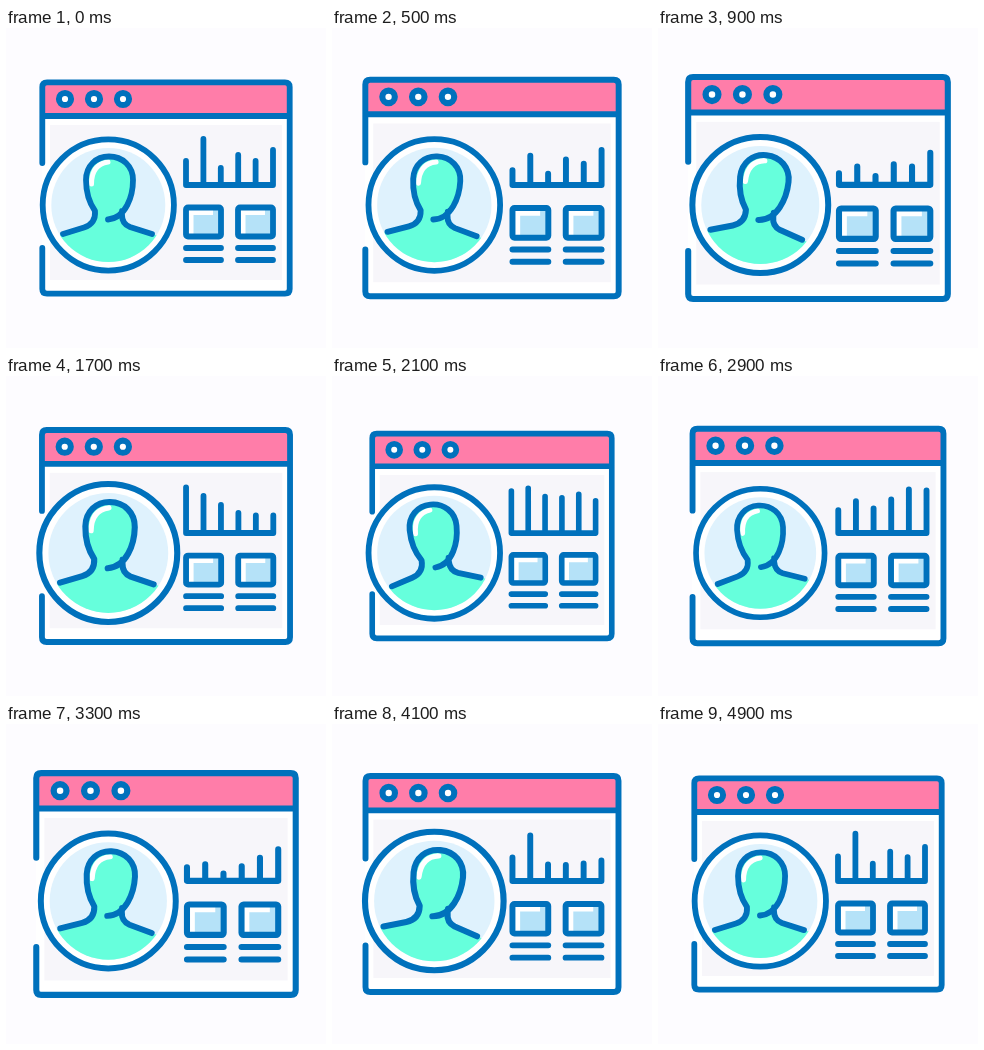
These frames come from a looping animation (320 by 320 pixels, 5 s). An HTML page:

```html
<!DOCTYPE html>
<html lang="en">
<head>
<meta charset="utf-8">
<title>Profile window</title>
<style>
  html, body { margin: 0; width: 100%; height: 100%; overflow: hidden; background: #fdfcff; }
  svg { display: block; width: 100vw; height: 100vh; }
  .line { fill: none; stroke: #0071bc; stroke-width: 5.8; stroke-linecap: round; stroke-linejoin: round; }
  .shine { fill: none; stroke: #fff; stroke-width: 5; }
</style>
</head>
<body>
<svg viewBox="0 0 320 320">
  <defs>
    <clipPath id="disc"><circle cx="102.3" cy="177" r="57"/></clipPath>
    <g id="tile">
      <rect x="180" y="179.500" width="35" height="29" fill="#b5e2f8"/>
      <path class="shine" d="M185 206V184.500H207"/>
      <rect class="line" x="180" y="179.500" width="35" height="29" rx="2"/>
      <path class="line" d="M180 220H215M180 232H215"/>
    </g>
    <circle id="dot" cx="59" cy="71" r="6.1" fill="#fff" stroke="#0071bc" stroke-width="6"/>
  </defs>

  <g id="win">
    <rect x="36" y="54" width="248" height="212" rx="5" fill="#fff"/>
    <rect x="44" y="97" width="232" height="155" fill="#f7f6fa"/>
    <path fill="#ff7da9" d="M36 88V59Q36 54 41 54H279Q284 54 284 59V88Z"/>
    <path class="line" d="M36.300 135V59Q36.300 54.300 41 54.300H279Q283.700 54.300 283.700 59V261Q283.700 265.700 279 265.700H41Q36.300 265.700 36.300 261V220M36.300 88H283.700"/>
    <use href="#dot"/><use href="#dot" x="29"/><use href="#dot" x="58"/>
    <path id="bars" class="line"/>
    <use href="#tile"/><use href="#tile" x="52"/>
  </g>

  <g id="avatar">
    <circle cx="102.3" cy="177" r="65.600" fill="#fff"/>
    <circle cx="102.3" cy="177" r="57" fill="#dff2fd"/>
    <g clip-path="url(#disc)">
      <path class="turn" fill="#66ffdc" d="M30 214L57 206L78 199.500Q90 195.500 89 183Q80 170 80 152C80 138 90 128.500 103 128.500C116.500 128.500 127 138 127 152C127 165 123 176 116 183V187Q116 196 124 199L146 206L174 214V260H30Z"/>
    </g>
    <g class="turn">
      <path class="shine" stroke-linecap="round" d="M85.500 156C85.500 143 91 135.500 102 134"/>
      <path class="line" d="M57 206L78 199.500Q90 195.500 89 183Q80 170 80 152C80 138 90 128.500 103 128.500C116.500 128.500 127 138 127 152C127 168 120 190 102 191.500M116 183V187Q116 196 124 199L146 206"/>
    </g>
    <circle class="line" cx="102.3" cy="177" r="65.600"/>
  </g>
</svg>
<script>
const $ = id => document.getElementById(id);
const LOOP = 5000, STEP = 100;

// Bar heights, one row per bar, at the shared times below
const barTimes = [0, 900, 1700, 2500, 3300, 4100, LOOP];
const barHeights = [
  [24, 11, 45.5, 34.5, 13, 23],
  [46, 17.5, 37, 49, 15.7, 44.5],
  [17, 8.5, 28, 41, 7, 16],
  [30, 19.5, 20, 48.5, 14, 15.5],
  [24, 17.5, 17.5, 58, 22, 17],
  [35, 30.5, 17.5, 48.5, 30, 20]
];

function segment(t, times) {
  let i = 0;
  while (i < times.length - 2 && t >= times[i + 1]) i++;
  const p = (t - times[i]) / (times[i + 1] - times[i]);
  return [i, Math.min(1, Math.max(0, p))];
}

function ease(t, times, vals) {
  const [i, p] = segment(t, times);
  return vals[i] + (vals[i + 1] - vals[i]) * (1 - Math.cos(Math.PI * p)) / 2;
}

// Smooth closed curve through the values
function spline(t, times, vals) {
  const [i, p] = segment(t, times), n = vals.length;
  const [a, b, c, d] = [-1, 0, 1, 2].map(k => vals[(i + k + n) % n]);
  return b + p / 2 * (c - a + p * (2 * a - 5 * b + 4 * c - d + p * (3 * (b - c) + d - a)));
}

const scaleAt = (x, y, s) => `translate(${x} ${y}) scale(${s}) translate(${-x} ${-y})`;

function draw(t) {
  const win = ease(t, [0, 1050, 2250, 3450, 4650], [1, 1.052, 0.965, 1.052, 1]);
  const avatar = ease(t, [350, 1400, 2600, 3800, LOOP], [1, 1.066, 0.965, 1.066, 1]);
  const angle = ease(t, [0, 1150, 2400, 3800, LOOP], [0, 7, -7.5, 7, 0]);

  $('win').setAttribute('transform', scaleAt(160, 160, win));
  $('avatar').setAttribute('transform', scaleAt(102.3, 177, avatar));
  for (const el of document.querySelectorAll('.turn'))
    el.setAttribute('transform', `rotate(${angle} 102.3 177)`);

  $('bars').setAttribute('d', 'M180 157H267' + barHeights.map((row, i) =>
    `M${180 + i * 17.4} 157v${-spline(t, barTimes, row)}`).join(''));
}

const start = performance.now();
function tick() {
  const t = (performance.now() - start) % LOOP;
  draw(Math.floor(t / STEP) * STEP);
  requestAnimationFrame(tick);
}
tick();
</script>
</body>
</html>
```
